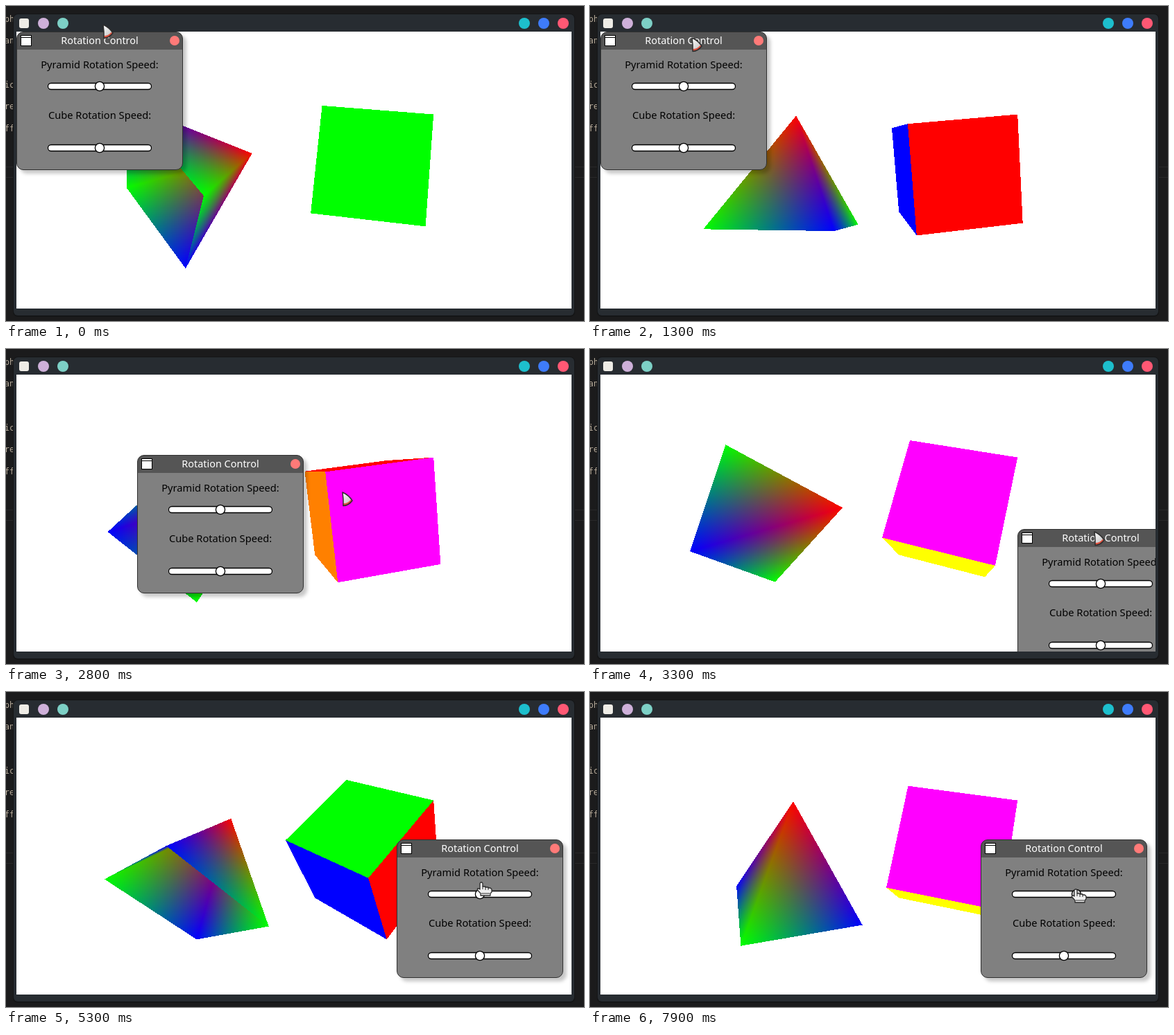
Write an HTML page with a canvas that moves like this. It is 833x455 px and loops after 8 s.

```html
<!DOCTYPE html>
<html lang="en">
<head>
<meta charset="utf-8">
<title>Rotation Control</title>
<style>
  html, body { margin: 0; width: 100%; height: 100%; overflow: hidden; background: #1b1b1c; }
  body { position: relative; }
  svg, canvas { position: absolute; display: block; }
  svg { left: 0; top: 0; }
  canvas { left: 15px; top: 37px; }
  .code { font: 11.5px "DejaVu Sans Mono", monospace; fill: #b9ad9c; }
  .ui { font: 14.667px "Noto Sans", sans-serif; text-anchor: middle; }
  .ui .title { font-size: 14.45px; fill: #fff; }
  #dialog { filter: drop-shadow(5px 5px 2.5px rgba(0, 0, 0, .22)); }
</style>
</head>
<body>
<svg width="833" height="455">
  <rect width="833" height="455" fill="#1b1b1c"/>
  <path d="M0 232.5H833M0 247.5H833" stroke="#292929"/>
  <g class="code">
    <text x="-2" y="23">ph</text>
    <text x="-2" y="54">an</text>
    <text x="-2" y="118">ic</text>
    <text x="-2" y="149">re</text>
    <text x="-2" y="181">ff</text>
  </g>
  <rect x="10" y="11" width="810" height="438" rx="7" fill="#141516"/>
  <rect x="11" y="12" width="808" height="435" rx="6" fill="#272c31"/>
  <rect x="19" y="18" width="14" height="14" rx="3" fill="#eeece6"/>
  <circle cx="54" cy="25" r="8" fill="#ceb0d9"/>
  <circle cx="82" cy="25" r="8" fill="#7dd0c6"/>
  <circle cx="747" cy="25" r="8" fill="#1dbfcd"/>
  <circle cx="775" cy="25" r="8" fill="#3e7cfb"/>
  <circle cx="803" cy="25" r="8" fill="#ff5874"/>
</svg>
<canvas id="view" width="800" height="400"></canvas>
<svg width="833" height="455">
  <defs>
    <clipPath id="inside"><rect x="15" y="37" width="800" height="400"/></clipPath>
    <linearGradient id="metal" x2=".6" y2="1">
      <stop stop-color="#fff"/><stop offset="1" stop-color="#c4c4c4"/>
    </linearGradient>
  </defs>
  <g clip-path="url(#inside)">
    <g id="dialog">
      <rect x=".5" y=".5" width="239" height="199" rx="9.5" fill="#808080"/>
      <path d="M.5 26V10A9.5 9.5 0 0 1 10 .5H230A9.5 9.5 0 0 1 239.5 10V26Z" fill="#555"/>
      <rect x=".5" y=".5" width="239" height="199" rx="9.5" fill="none" stroke="#303030"/>
      <rect x="6.5" y="5.5" width="15" height="15" fill="#fff" stroke="#000"/>
      <path d="M6 8.5H22" stroke="#000"/>
      <circle cx="228" cy="13" r="7" fill="#ff7a78"/>
      <g class="ui">
        <text class="title" x="120" y="18">Rotation Control</text>
        <text x="120" y="53">Pyramid Rotation Speed:</text>
        <text x="120" y="126">Cube Rotation Speed:</text>
      </g>
      <g fill="#fff" stroke="#000" stroke-width="1.3">
        <rect x="45.5" y="74.5" width="149" height="9" rx="4.5"/>
        <rect x="45.5" y="163.5" width="149" height="9" rx="4.5"/>
        <circle id="knob" cx="120" cy="79" r="6.6"/>
        <circle cx="120" cy="168" r="6.6"/>
      </g>
    </g>
  </g>
  <g id="arrow" stroke-linejoin="round">
    <path d="M0 0Q9 4 14 12Q9 19 1 19.5Q1.500 10 0 0Z" fill="url(#metal)"/>
    <path d="M14 12Q9 19 1 19.5L1.300 16Q8 16 11.500 11Z" fill="#e2513f"/>
    <path d="M0 0Q9 4 14 12Q9 19 1 19.5Q1.500 10 0 0Z" fill="none" stroke="#2d2d2d" stroke-width="1.5"/>
  </g>
  <g id="hand" stroke="#2a2a2a" stroke-width="1.3" stroke-linejoin="round">
    <path d="M-2 1.500L-1 0H1L2 1.500V6H6V7H10V8H13L15 10V14L13 16V19H-1V16L-5.500 11V9H-3L-2 10Z" fill="#eee"/>
    <path d="M6 7V11M10 8V11M2 6V10M0 16H12" fill="none" stroke-width="1"/>
  </g>
</svg>
<script>
const LOOP = 8000, STEP = 100;
const GRAB = 5860, RELEASE = 6520, REGRAB = 7200, POINT = 5300;
const W = 800, H = 400, FOCAL = 200 / Math.tan(Math.PI / 8);
const $ = id => document.getElementById(id);
const ctx = $("view").getContext("2d");
const image = ctx.createImageData(W, H);
const pixels = new Uint32Array(image.data.buffer);
const depth = new Float32Array(W * H);

// Both solids turn at one steady rate, in opposite directions.
const spin = t => .0771 * t - 109.5;

// Key points: [time, x, y], linear in between.
const dialogPath = [[0, 15, 37], [1700, 15, 37], [2100, 63, 92], [2300, 63, 92],
  [2700, 26, 108], [3100, 679, 287], [3300, 616, 260], [3400, 595, 255],
  [3700, 589, 213], [4500, 589, 213], [5000, 563, 213]];
// Pointer position within the dialog.
const pointerPath = [[0, 125, -10], [1300, 132, 9], [5000, 132, 9], [5400, 120, 80],
  [GRAB, 120, 80], [RELEASE, 45, 80], [REGRAB, 45, 80], [7900, 138, 72]];

function sample(path, t) {
  const i = path.findIndex(key => key[0] > t);
  if (i < 0) return path.at(-1).slice(1);
  const [t0, ...a] = path[i - 1], [t1, ...b] = path[i];
  const k = (t - t0) / (t1 - t0);
  return a.map((v, j) => v + (b[j] - v) * k);
}

const RED = [255, 0, 0], GREEN = [0, 255, 0], BLUE = [0, 0, 255];
const MAGENTA = [255, 0, 255], ORANGE = [255, 128, 0], YELLOW = [255, 255, 0];
const corners = [[-1, -1], [1, -1], [1, 1], [-1, 1]];

const apex = { p: [0, 1, 0], c: RED };
const base = corners.map(([x, z], i) => ({ p: [x, -1, z], c: i % 2 ? GREEN : BLUE }));
const pyramid = base.map((v, i) => [apex, v, base[(i + 1) % 4]]);

// Face colours come in pairs (positive, negative side) for x, y and z.
const cube = [MAGENTA, BLUE, GREEN, ORANGE, RED, YELLOW].flatMap((c, i) => {
  const axis = i >> 1, side = i % 2 ? -1 : 1;
  const quad = corners.map(([u, v]) => {
    const p = [];
    p[axis] = side;
    p[(axis + 1) % 3] = u;
    p[(axis + 2) % 3] = v;
    return { p, c };
  });
  return [[quad[0], quad[1], quad[2]], [quad[0], quad[2], quad[3]]];
});

function rotate([x, y, z], axis, degrees) {
  const len = Math.hypot(...axis), [a, b, c] = axis.map(v => v / len);
  const r = degrees * Math.PI / 180, cos = Math.cos(r), sin = Math.sin(r);
  const d = (a * x + b * y + c * z) * (1 - cos);
  return [x * cos + (b * z - c * y) * sin + a * d,
          y * cos + (c * x - a * z) * sin + b * d,
          z * cos + (a * y - b * x) * sin + c * d];
}

// Perspective-correct colour triangle with depth test.
function fillTriangle([A, B, C]) {
  const area = (B.x - A.x) * (C.y - A.y) - (C.x - A.x) * (B.y - A.y);
  if (Math.abs(area) < 1e-6) return;
  const xs = [A.x, B.x, C.x], ys = [A.y, B.y, C.y];
  const x0 = Math.max(0, Math.floor(Math.min(...xs))), x1 = Math.min(W - 1, Math.ceil(Math.max(...xs)));
  const y0 = Math.max(0, Math.floor(Math.min(...ys))), y1 = Math.min(H - 1, Math.ceil(Math.max(...ys)));
  for (let y = y0; y <= y1; y++) {
    for (let x = x0; x <= x1; x++) {
      const px = x + .5, py = y + .5;
      let a = ((B.x - px) * (C.y - py) - (C.x - px) * (B.y - py)) / area;
      let b = ((C.x - px) * (A.y - py) - (A.x - px) * (C.y - py)) / area;
      let c = 1 - a - b;
      if (a < 0 || b < 0 || c < 0) continue;
      a *= A.w; b *= B.w; c *= C.w;
      const w = a + b + c, i = y * W + x;
      if (w <= depth[i]) continue;
      depth[i] = w;
      const mix = k => Math.round((a * A.c[k] + b * B.c[k] + c * C.c[k]) / w);
      pixels[i] = (255 << 24 | mix(2) << 16 | mix(1) << 8 | mix(0)) >>> 0;
    }
  }
}

function drawSolid(faces, axis, angle, dx, dz) {
  for (const face of faces) {
    fillTriangle(face.map(({ p, c }) => {
      const [x, y, z] = rotate(p, axis, angle), w = 1 / (dz - z);
      return { x: W / 2 + FOCAL * (x + dx) * w, y: H / 2 - FOCAL * y * w, w, c };
    }));
  }
}

function move(el, x, y) {
  el.setAttribute("transform", `translate(${Math.round(x)} ${Math.round(y)})`);
}

function render(t) {
  pixels.fill(0xffffffff);
  depth.fill(0);
  // The slider takes effect on release and stops the pyramid.
  drawSolid(pyramid, [1, 1, 0], spin(Math.min(t, RELEASE)), -1.5, 6);
  drawSolid(cube, [1, 1, 1], -spin(t), 1.5, 7);
  ctx.putImageData(image, 0, 0);

  // The dialog trails the pointer by one step.
  const [x, y] = sample(dialogPath, t), [leadX, leadY] = sample(dialogPath, t + STEP);
  const [px, py] = sample(pointerPath, t);
  const pointing = t >= POINT;
  move($("dialog"), x, y);
  move($("arrow"), leadX + px, leadY + py);
  move($("hand"), leadX + px - 1, leadY + py);
  $("arrow").style.display = pointing ? "none" : "";
  $("hand").style.display = pointing ? "" : "none";

  const pressed = (t >= GRAB && t < RELEASE) || t >= REGRAB;
  $("knob").setAttribute("cx", t < GRAB ? 120 : px);
  $("knob").setAttribute("fill", pressed ? "#c8c8c8" : "#fff");
}

let start, shown = -1;
function tick(now) {
  start ??= now;
  const t = Math.floor((now - start) % LOOP / STEP) * STEP;
  if (t !== shown) render(shown = t);
  requestAnimationFrame(tick);
}
render(0);
requestAnimationFrame(tick);
</script>
</body>
</html>
```
